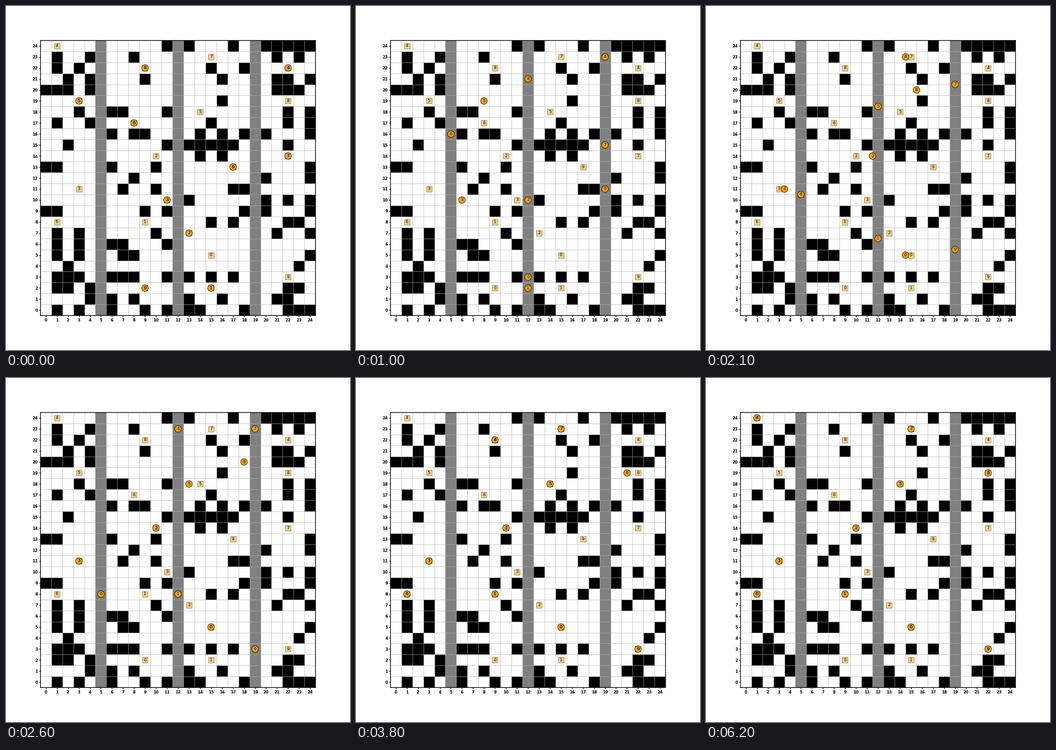
Recreate the animation shown at these times as a matplotlib script. Size 748 by 748 pixels, loop 6.4 s.

```python
import numpy as np
import matplotlib.pyplot as plt
from matplotlib.animation import FuncAnimation
from matplotlib.patches import Circle, Rectangle

SIZE, DPI, N = 748, 68, 25
FRAME_MS, FRAMES, PER_STEP = 100, 64, 2

plt.rcParams["font.family"] = "DejaVu Sans"

# Blocked columns of each row, bottom row first
WALLS = [
    (1, 3, 6, 9, 11, 13, 14, 18, 22, 23, 24),
    (4, 6, 8, 13, 16, 21, 22),
    (1, 2, 4, 22, 23),
    (1, 2, 3, 6, 7, 8, 11, 13, 15, 17),
    (2, 23),
    (1, 3, 7, 8, 24),
    (1, 3, 6, 7, 11),
    (1, 3, 10, 21, 24),
    (15, 17, 22, 23),
    (0, 1, 9, 11, 18, 20, 24),
    (13, 20, 22, 24),
    (7, 10, 17, 18),
    (8, 20, 24),
    (0, 1, 6, 10, 24),
    (14, 16),
    (2, 11, 13, 14, 15, 16, 17, 22),
    (6, 8, 9, 14, 16, 18, 20, 24),
    (1, 4, 15, 22, 24),
    (3, 6, 7, 11, 22, 24),
    (16,),
    (0, 1, 2, 4, 21, 22, 23),
    (2, 4, 9, 16, 21, 22, 24),
    (1, 3, 15, 18),
    (1, 4, 8, 21, 23),
    (11, 13, 17, 20, 21, 22, 23, 24),
]
AISLES = (5, 12, 19)

# Start cell and moves per robot; a turn costs one waiting step (W)
ROBOTS = [
    ((9, 2), "R3 W1 U3 W1 R3"),
    ((15, 2), "L2 W2 L1 W1 U6 W1 L3"),
    ((13, 7), "L1 W1 U7 W1 L2"),
    ((11, 10), "L6 W1 U1 W1 L2"),
    ((22, 22), "L3 W1 U1 W1 L7 W1 D1 W1 L7 W1 U2 W1 L4"),
    ((3, 19), "R9 W1 D1 W1 R2"),
    ((8, 17), "L3 W1 D9 W1 L4"),
    ((22, 14), "L3 W1 U9 W1 L4"),
    ((9, 22), "R3 W1 D2 W1 R7 W1 D1 W1 R3"),
    ((17, 13), "R2 W1 D10 W1 R3"),
]
MOVES = {"L": (-1, 0), "R": (1, 0), "U": (0, 1), "D": (0, -1), "W": (0, 0)}


def trace(start, plan):
    """Cells visited, one per step."""
    cells = [start]
    for leg in plan.split():
        dx, dy = MOVES[leg[0]]
        for _ in range(int(leg[1:])):
            x, y = cells[-1]
            cells.append((x + dx, y + dy))
    return np.array(cells, float)


def position(path, step):
    """Linear movement between cells, resting at the last one."""
    ticks = np.arange(len(path))
    return np.interp(step, ticks, path[:, 0]), np.interp(step, ticks, path[:, 1])


def cell(x, y, color, height=1):
    ax.add_patch(Rectangle((x - 0.5, y - 0.5), 1, height, fc=color, lw=0, zorder=0))


def label(x, y, text):
    return ax.text(x, y, text, size=10, ha="center", va="center", zorder=4)


def station(x, y, text):
    ax.add_patch(Rectangle((x - 0.25, y - 0.25), 0.5, 0.5, fc="orange",
                           ec="black", alpha=0.5, lw=1, zorder=2))
    label(x, y, text)


fig = plt.figure(figsize=(SIZE / DPI, SIZE / DPI), dpi=DPI, facecolor="white")
ax = fig.add_axes([0.1, 0.1, 0.8, 0.8])
ax.set(xlim=(-0.5, N - 0.5), ylim=(-0.5, N - 0.5))

for col in AISLES:
    cell(col, 0, "gray", N)
for row, cols in enumerate(WALLS):
    for col in cols:
        cell(col, row, "black")

ax.set_axisbelow(False)
for axis in (ax.xaxis, ax.yaxis):
    axis.set_ticks(np.arange(N))
    axis.set_ticks(np.arange(N - 1) + 0.5, minor=True)
ax.tick_params(which="minor", length=0)
ax.tick_params(axis="x", length=3.5, width=1.5, pad=3, labelsize=9)
ax.tick_params(axis="y", length=3.5, width=1.5, pad=2.5, labelsize=9)
for text in ax.get_xticklabels() + ax.get_yticklabels():
    text.set_fontweight("bold")
for k in np.arange(N - 1) + 0.5:
    ax.axvline(k, color="#b0b0b0", lw=0.8, zorder=1)
    ax.axhline(k, color="#b0b0b0", lw=0.8, zorder=1)
for spine in ax.spines.values():
    spine.set_linewidth(1.6)

paths = [trace(*robot) for robot in ROBOTS]
for i, path in enumerate(paths):
    station(*path[0], str(i))
    station(*path[-1], str(i))

discs, names = [], []
for i, path in enumerate(paths):
    disc = Circle(path[0], 0.3, fc="orange", ec="black", lw=1, zorder=3)
    discs.append(ax.add_patch(disc))
    names.append(label(*path[0], str(i)))


def update(frame):
    for path, disc, name in zip(paths, discs, names):
        spot = position(path, frame / PER_STEP)
        disc.center = spot
        name.set_position(spot)
    return discs + names


anim = FuncAnimation(fig, update, frames=FRAMES, interval=FRAME_MS,
                     init_func=lambda: update(0), repeat=True, repeat_delay=0)
plt.show()
```
